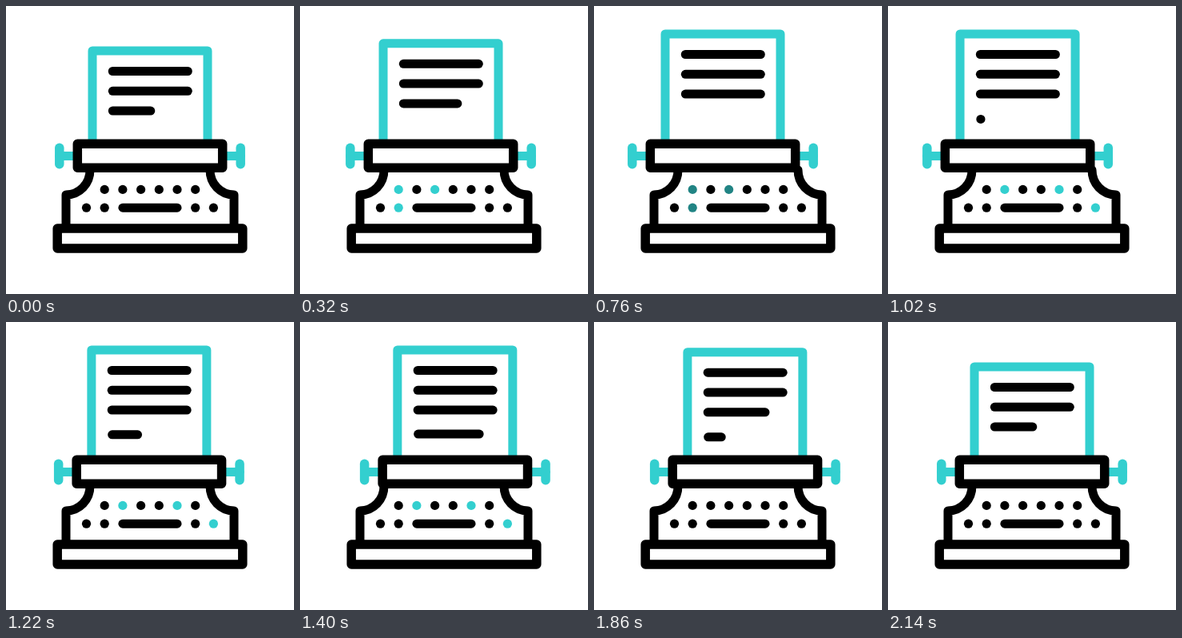
Animation of 360x360 px, one loop 2400 ms. Source, as an HTML page with a canvas:

```html
<!DOCTYPE html>
<html lang="en">
<head>
<meta charset="utf-8">
<title>Typewriter</title>
<style>
  html, body { margin: 0; width: 100%; height: 100%; overflow: hidden; background: #fff; }
  canvas { display: block; width: 360px; height: 360px; }
</style>
</head>
<body>
<canvas id="stage"></canvas>
<script>
const LOOP = 2400;
const TEAL = [51, 207, 207];
const canvas = document.getElementById('stage');
const ctx = canvas.getContext('2d');
const scale = window.devicePixelRatio || 1;
canvas.width = canvas.height = 360 * scale;

// Eased 0..1 progress between two times
function ease(t, from, to) {
  const u = Math.min(1, Math.max(0, (t - from) / (to - from)));
  return u * u * (3 - 2 * u);
}

function tint(k) {
  return `rgb(${TEAL.map(c => Math.round(c * k)).join(',')})`;
}

function line(x1, y1, x2, y2, color = '#000', width = 11) {
  ctx.strokeStyle = color;
  ctx.lineWidth = width;
  ctx.beginPath();
  ctx.moveTo(x1, y1);
  ctx.lineTo(x2, y2);
  ctx.stroke();
}

function box(x, y, w, h) {
  ctx.fillStyle = '#fff';
  ctx.strokeStyle = '#000';
  ctx.lineWidth = 11.5;
  ctx.beginPath();
  ctx.rect(x, y, w, h);
  ctx.fill();
  ctx.stroke();
}

function key(x, y, glow = 0) {
  ctx.fillStyle = tint(glow);
  ctx.beginPath();
  ctx.arc(x, y, 5.6, 0, Math.PI * 2);
  ctx.fill();
}

function pose(t) {
  const back = 1 - ease(t, 1632, 2104);
  return {
    dx: t < 919 ? -21 * ease(t, 90, 919)
      : (-21 + 38 * ease(t, 919, 1505)) * back,
    dy: -(21 * ease(t, 0, 700) + 14 * ease(t, 1400, 1625)) * back,
    third: 47.5 + 46.5 * ease(t, 10, 695) * back,
    fourth: 94 * ease(t, 1010, 1550) * (1 - ease(t, 1663, 1933)),
    fourthOn: t >= 1000 && t < 1933,
    glowA: ease(t, 20, 150) - ease(t, 700, 850),
    glowB: ease(t, 850, 1000) - ease(t, 1705, 1850)
  };
}

function drawPaper(p) {
  const top = 56 + p.dy;
  ctx.fillStyle = '#fff';
  ctx.strokeStyle = tint(1);
  ctx.lineWidth = 11;
  ctx.beginPath();
  ctx.moveTo(108, 172);
  ctx.lineTo(108, top);
  ctx.lineTo(252, top);
  ctx.lineTo(252, 172);
  ctx.fill();
  ctx.stroke();

  [94, 94, p.third].forEach((len, i) => {
    const y = top + 25.5 + i * 24.8;
    line(133.3, y, 133.3 + len, y);
  });
  if (p.fourthOn) {
    const y = top + 106.4 - p.fourth * 0.017;
    line(133.8, y, 133.85 + p.fourth, y);
  }
}

function drawCarriage(p) {
  ctx.save();
  ctx.translate(p.dx, 0);
  drawPaper(p);
  for (const [x, end] of [[66.8, 88], [293.2, 272]]) {
    line(x, 187.5, end, 187.5, tint(1));
    line(x, 177.3, x, 197.7, tint(1), 11.5);
  }
  box(89.3, 172.3, 181.4, 30);
  ctx.restore();
}

function drawBody(p) {
  ctx.strokeStyle = '#000';
  ctx.lineWidth = 11;
  for (const side of [-1, 1]) {
    const x = d => 180 + side * d;
    ctx.beginPath();
    ctx.moveTo(x(75), 205);
    ctx.bezierCurveTo(x(75), 222, x(88), 236, x(105), 236);
    ctx.lineTo(x(105), 278);
    ctx.stroke();
  }
  box(64.2, 278, 231.6, 25);

  const top = [p.glowA, p.glowB, p.glowA, 0, p.glowB, 0];
  top.forEach((g, i) => key(123.2 + i * 22.7, 229.4, g));
  key(100.5, 252.2);
  key(123.2, 252.2, p.glowA);
  key(236.7, 252.2);
  key(259.4, 252.2, p.glowB);
  line(145.9, 252.2, 214, 252.2);
}

function frame(now) {
  const p = pose((now - start) % LOOP);
  ctx.setTransform(scale, 0, 0, scale, 0, 0);
  ctx.lineCap = ctx.lineJoin = 'round';
  ctx.fillStyle = '#fff';
  ctx.fillRect(0, 0, 360, 360);
  drawCarriage(p);
  drawBody(p);
  requestAnimationFrame(frame);
}

const start = performance.now();
frame(start);
</script>
</body>
</html>
```
